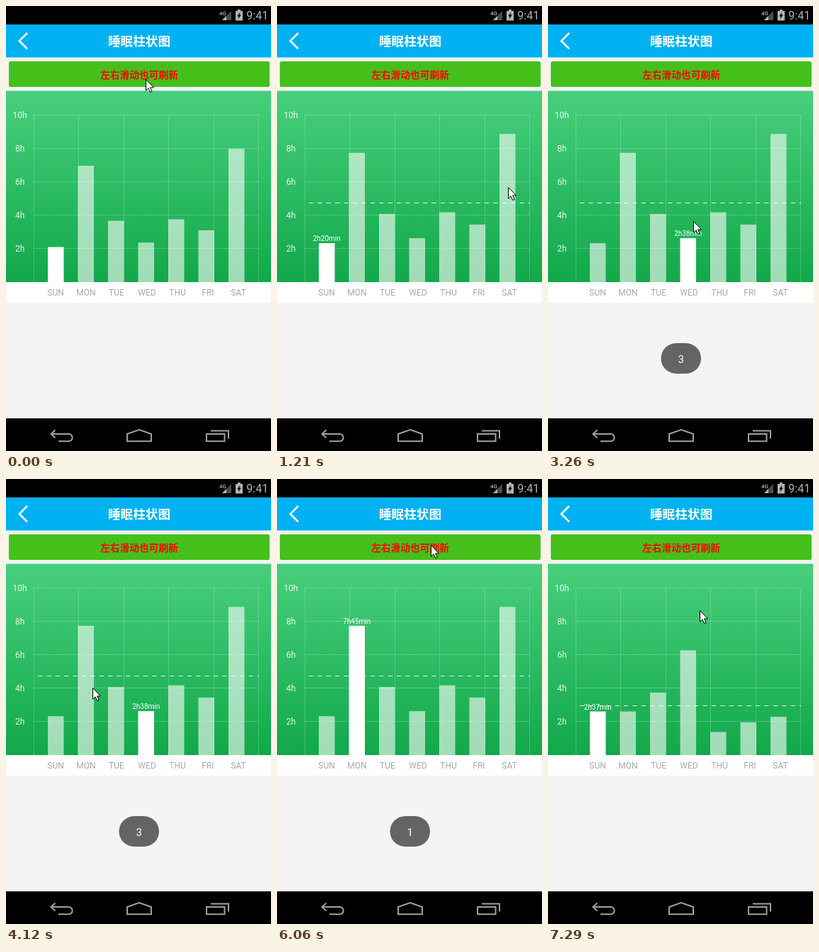
These frames come from a looping animation (374x627 px, 8 s). An HTML page:

```html
<!DOCTYPE html>
<html lang="zh-CN">
<head>
<meta charset="utf-8">
<title>睡眠柱状图</title>
<style>
  html, body { margin: 0; width: 100%; height: 100%; overflow: hidden; background: #f4f4f4; }
  svg { display: block; width: 374px; height: 627px; }
  text { font-family: Roboto, "Noto Sans CJK SC", "Noto Sans CJK", sans-serif; text-anchor: middle; }
  .axis { font-size: 12px; fill: #fff; fill-opacity: .9; }
  .day { font-size: 12px; fill: #a8a8a8; }
  .cjk { font-family: "Noto Sans CJK SC", "Noto Sans CJK", sans-serif; font-weight: 700; }
</style>
</head>
<body>
<svg viewBox="0 0 374 627">
  <defs>
    <linearGradient id="green" x1="0" y1="0" x2="0" y2="1">
      <stop offset="0" stop-color="#48cf7d"/>
      <stop offset="1" stop-color="#12a84a"/>
    </linearGradient>
  </defs>
  <rect width="374" height="627" fill="#f4f4f4"/>

  <!-- status bar -->
  <rect width="374" height="26"/>
  <g fill="#b4b4b4">
    <text x="306" y="12.5" font-size="8" font-weight="500">4G</text>
    <path d="M318 7V20H305Z" fill="#4c4c4c"/>
    <path d="M311 14V20H305Z"/>
    <path d="M327 5h4v2h3v13.5h-10V7h3Z"/>
    <path d="M330.5 8.5L326 14.5h2.6L327.5 18.5L332 12.6h-2.6Z" fill="#000"/>
    <text x="354.7" y="19" font-size="16">9:41</text>
  </g>

  <!-- header and button -->
  <rect y="26" width="374" height="46.5" fill="#00b1f1"/>
  <path d="M30 38L18.8 49.2L30 60.4" fill="none" stroke="#fff" stroke-width="2.6"/>
  <text class="cjk" x="188" y="56" font-size="17.6" fill="#fff">睡眠柱状图</text>
  <rect id="button" x="4" y="78" width="368" height="36" rx="2.5"/>
  <text class="cjk" x="188" y="101.5" font-size="13.75" fill="#f00">左右滑动也可刷新</text>

  <!-- chart -->
  <rect y="119.5" width="374" height="269.5" fill="url(#green)"/>
  <rect y="389" width="374" height="29" fill="#fff"/>
  <g id="grid"></g>
  <g id="bars" fill="#fff"></g>
  <path id="mean" d="M45 0H357" stroke="#fff" stroke-opacity=".85" stroke-dasharray="6.2 6.2"/>
  <text id="label" font-size="10" fill="#fff"></text>

  <!-- toast -->
  <g id="toast">
    <rect x="159.5" y="475" width="56.5" height="43" rx="21.5" fill="#646464"/>
    <text id="digit" x="187.7" y="502.5" font-size="15" fill="#fff"></text>
  </g>

  <!-- navigation bar -->
  <rect y="581" width="374" height="46"/>
  <g fill="none" stroke="#a0a0a0" stroke-width="2">
    <path d="M69.5 597.5L63.5 603L69.5 608.5M63.5 603H88.5a5 5 0 0 1 0 10.3H74"/>
    <path d="M171 613.3V603L188 597L205 603V613.3Z"/>
    <path d="M283 603H308.5V613.3H283ZM289 598.5H314V609.5"/>
  </g>

  <path id="cursor" d="M.5 .5V16.2L4 12.8L6.6 18.5L9.1 17.4L6.6 11.9H11.5Z" fill="#fff" stroke="#000"/>
</svg>
<script>
const LOOP = 8000, BASE = 389, HOUR = 23.5;
const NS = 'http://www.w3.org/2000/svg';
const $ = id => document.getElementById(id);

function add(parent, tag, attrs, text = '') {
  const el = parent.appendChild(document.createElementNS(NS, tag));
  set(el, attrs);
  el.textContent = text;
  return el;
}
function set(el, attrs) {
  for (const k in attrs) el.setAttribute(k, attrs[k]);
}

// minutes slept, Sunday to Saturday
const weeks = [
  [140, 465, 245, 158, 251, 207, 533],
  [157, 157, 225, 377, 83, 118, 138]
];
const days = ['SUN', 'MON', 'TUE', 'WED', 'THU', 'FRI', 'SAT'];
const height = min => min / 60 * HOUR;
const barX = i => 59 + 42.5 * i;

const line = { stroke: '#fff', 'stroke-opacity': .2 };
for (let h = 2; h <= 10; h += 2) {
  const y = BASE - h * HOUR;
  add($('grid'), 'path', { d: `M39 ${y - .5}H357`, ...line });
  add($('grid'), 'text', { class: 'axis', x: 19.6, y: y + 4 }, h + 'h');
}
for (let i = 0; i < 6; i++)
  add($('grid'), 'path', { d: `M${Math.round(39 + 63.4 * i) + .5} 153V389`, ...line });

const bars = days.map((name, i) => {
  add($('grid'), 'text', { class: 'day', x: 70 + 43 * i, y: 408 }, name);
  return add($('bars'), 'rect', { x: barX(i), width: 22.5 });
});

// each step changes some of the state and holds until the next
const steps = [
  [0, { at: [197, 103], week: 0, grow: .9, day: 0, toast: 0, digit: '', down: false }],
  [120, { grow: 1 }],
  [370, { at: [207, 131] }],
  [520, { at: [217, 159] }],
  [670, { at: [229, 182] }],
  [820, { at: [190, 213] }],
  [940, { at: [132, 239] }],
  [1060, { at: [145, 246] }],
  [1210, { at: [326, 255] }],
  [1890, { day: 6 }],
  [2010, { toast: .3, digit: 6 }],
  [2130, { toast: .62 }],
  [2280, { at: [325, 257] }],
  [2430, { at: [252, 294], toast: 1 }],
  [2590, { at: [215, 302] }],
  [2740, { at: [208, 303] }],
  [2860, { at: [205, 303] }],
  [3260, { day: 3, digit: 3 }],
  [3700, { at: [175, 303] }],
  [3850, { at: [164, 302] }],
  [4000, { at: [140, 299] }],
  [4120, { at: [122, 294] }],
  [4770, { day: 1, digit: 1 }],
  [5360, { at: [168, 205] }],
  [5480, { at: [204, 105] }],
  [5630, { at: [213, 82] }],
  [5910, { at: [215, 84] }],
  [6060, { at: [217, 93] }],
  [6490, { down: true }],
  [6610, { down: false, week: 1, day: 0, grow: .297 }],
  [6760, { grow: .797 }],
  [6900, { grow: 1 }],
  [7020, { at: [216, 115], toast: .8 }],
  [7140, { at: [215, 152], toast: .4 }],
  [7290, { at: [214, 185], toast: 0 }]
];

const stateAt = t => Object.assign({}, ...steps.filter(s => s[0] <= t).map(s => s[1]));

function draw(t) {
  const s = stateAt(t), week = weeks[s.week], done = s.grow === 1;
  bars.forEach((bar, i) => {
    const h = height(week[i]) * s.grow;
    set(bar, { y: BASE - h, height: h, 'fill-opacity': i === s.day ? 1 : .6 });
  });

  const mean = week.reduce((a, b) => a + b) / week.length;
  const meanY = Math.round(BASE - height(mean)) + .5;
  set($('mean'), { transform: `translate(0 ${meanY})`, opacity: +done });

  const min = week[s.day];
  $('label').textContent = done ? `${Math.floor(min / 60)}h${min % 60}min` : '';
  set($('label'), { x: barX(s.day) + 11.2, y: BASE - height(min) - 2.8 });

  set($('toast'), { opacity: s.toast });
  $('digit').textContent = s.digit;
  set($('button'), { fill: s.down ? '#379a15' : '#45c01b' });
  set($('cursor'), { transform: `translate(${s.at})` });
}

const start = performance.now();
function tick() {
  draw((performance.now() - start) % LOOP);
  requestAnimationFrame(tick);
}
tick();
</script>
</body>
</html>
```
